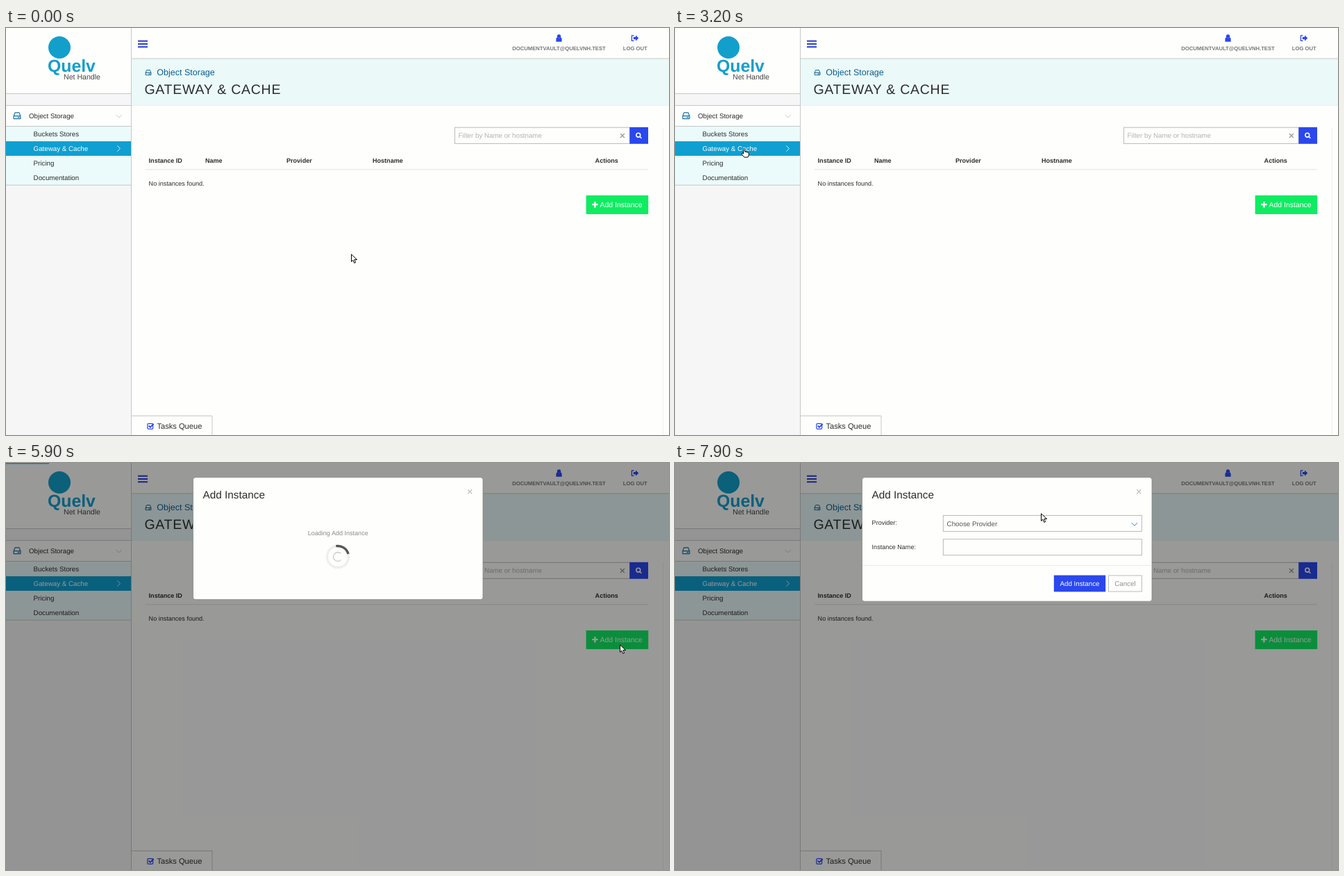
Recreate the animation shown at these times as an HTML page. Size 955 by 586 pixels, loop 8000 ms.

```html
<!DOCTYPE html>
<html lang="en">
<head>
<meta charset="utf-8">
<title>Gateway &amp; Cache</title>
<style>
  html, body { margin: 0; width: 100%; height: 100%; overflow: hidden; background: #fefefd; }
  svg { display: block; }
  text { font: 9.75px "Liberation Sans", Arial, sans-serif; fill: #2d2d2d; text-rendering: geometricPrecision; }
  .small text, text.small { font-size: 9.05px; }
  .head text { font-size: 9.05px; font-weight: bold; }
  .user text { font-size: 7.65px; font-weight: bold; fill: #777; }
  .line { fill: none; stroke: #c6c8c8; }
  .box rect { fill: #fefefd; stroke: #b9bbbb; }
  .blue { fill: #2a48ee; }
  .mid { text-anchor: middle; }
  text.white { fill: #fff; }
  .icon { fill: none; stroke-width: 1.2; stroke-linejoin: round; }
  .cursor { fill: #fff; stroke: #000; stroke-linejoin: round; }
</style>
</head>
<body>
<svg width="955" height="586">
  <defs>
    <g id="disk" class="icon">
      <path d="M.6 5.4 2.5.6H8.5L10.4 5.4V9.3H.6ZM.6 5.4H10.4M6.2 7.4H9"/>
    </g>
    <path id="chevron" d="M-4.1 -2.1 0 2.1 4.1 -2.1" fill="none"/>
    <path id="cross" d="M-3 -3 3 3M3 -3 -3 3" stroke-width="1.3"/>
  </defs>

  <!-- sidebar -->
  <rect width="180" height="586" fill="#f5f6f5"/>
  <rect width="180" height="94" fill="#fefefd"/>
  <rect y="112" width="180" height="30" fill="#fefefd"/>
  <rect y="142" width="180" height="84" fill="#ebfafa"/>
  <rect y="163.1" width="180" height="20.9" fill="#0f9fd0"/>
  <path class="line" d="M0 94.5H180M0 111.5H180M0 141.5H180M0 226.2H180M180.5 0V586"/>
  <circle cx="77" cy="28" r="16" fill="#139fcb"/>
  <text x="60" y="63" style="font-size:24.8px;font-weight:bold;fill:#139fcb">Quelv</text>
  <text x="83" y="73.6" style="font-size:10.6px;fill:#444">Net Handle</text>
  <use href="#disk" x="10.5" y="121.3" stroke="#14739f"/>
  <text x="33" y="130.4">Object Storage</text>
  <use href="#chevron" x="162.7" y="127" stroke="#c9cccc"/>
  <g id="menu"></g>
  <use href="#chevron" transform="translate(162.4 173.5) rotate(-90)" stroke="#d5f1fa"/>

  <!-- top bar -->
  <path d="M190 18.8H204M190 23H204M190 27.2H204" stroke="#2a3fcf" stroke-width="2"/>
  <g class="user mid">
    <text x="796.5" y="32">DOCUMENTVAULT@QUELVNH.TEST</text>
    <text x="906.2" y="32">LOG OUT</text>
  </g>
  <g class="blue">
    <circle cx="796.5" cy="12" r="2.7"/>
    <path d="M792.4 19.7V16Q792.4 13.6 794.3 13.6L796.5 15 798.7 13.6Q800.6 13.6 800.6 16V19.7Z"/>
    <path d="M903.8 13H907V10.5L911.3 14.6 907 18.7V16.2H903.8Z"/>
    <path d="M904.6 10.8H901.4V18.4H904.6" fill="none" stroke="#2a48ee" stroke-width="1.3" stroke-linejoin="round"/>
  </g>
  <rect x="181" y="44.5" width="774" height="67" fill="#ebf9f9"/>
  <path class="line" d="M181 44H955"/>
  <path d="M181 111.4H955" stroke="#e1eeee" stroke-width=".7"/>
  <use href="#disk" transform="translate(200.6 60.2) scale(.8)" stroke="#0b5f8f"/>
  <text x="217.3" y="67.6" style="font-size:12.53px;fill:#0b5f8f">Object Storage</text>
  <text x="199.4" y="95" style="font-size:19.5px;letter-spacing:.74px">GATEWAY &amp; CACHE</text>

  <!-- filter and table -->
  <g class="box"><rect x="646.5" y="143.2" width="252" height="23.2"/></g>
  <text x="651.6" y="158.4" style="fill:#b1b3b3">Filter by Name or hostname</text>
  <use href="#cross" x="887.9" y="155" stroke="#999"/>
  <rect class="blue" x="898.3" y="142.8" width="26.7" height="24"/>
  <g fill="none" stroke="#fff" stroke-width="1.6">
    <circle cx="910.8" cy="154.2" r="2.9"/>
    <path d="M912.9 156.3 915.4 158.8"/>
  </g>
  <g class="head">
    <text x="205.6" y="194">Instance ID</text>
    <text x="287" y="194">Name</text>
    <text x="404" y="194">Provider</text>
    <text x="528" y="194">Hostname</text>
    <text x="848.6" y="194">Actions</text>
  </g>
  <path d="M201 203.8H925" stroke="#dfe1e1"/>
  <path d="M946.3 143V586" stroke="#eceeee"/>
  <text class="small" x="205.6" y="227.4">No instances found.</text>
  <rect id="add" x="835.6" y="241" width="89.6" height="27"/>
  <path d="M844.2 254.2H852.6M848.4 250V258.4" stroke="#fff" stroke-width="2.3"/>
  <text class="white" x="855.6" y="258" style="font-size:10.44px">Add Instance</text>

  <!-- tasks tab -->
  <path class="line" d="M181 558.5H297V586"/>
  <g class="icon" stroke="#2a48ee">
    <rect x="203.8" y="569.6" width="7.8" height="7.8" rx="1.4"/>
    <path d="M205.6 572.6 207.9 574.9 212.7 570" stroke-width="1.8"/>
  </g>
  <text x="217.4" y="577" style="font-size:11.14px">Tasks Queue</text>

  <!-- dialog -->
  <g id="dialog">
    <rect width="955" height="586" fill="#000" fill-opacity=".4"/>
    <rect id="progress" height="1.4" fill="#0b78a8"/>
    <rect id="panel" x="269.5" y="20.8" width="417.5" rx="3.5" fill="#fefefd" stroke="#7f817d" stroke-width=".7"/>
    <text x="283.6" y="51" style="font-size:15.3px">Add Instance</text>
    <use href="#cross" x="668.2" y="41.2" stroke="#bfc1c1"/>
    <g id="loading" fill="none">
      <text class="small mid" x="478.2" y="104" style="fill:#8a8a8a">Loading Add Instance</text>
      <circle cx="478" cy="135" r="15.5" stroke="#eeefef" stroke-width="3.4"/>
      <g id="spin">
        <path d="M475.3 119.7A15.5 15.5 0 0 1 493 131" stroke="#555" stroke-width="3.4"/>
        <path d="M482.6 139.6A6.5 6.5 0 1 1 482.6 130.4" stroke="#c9cbcb" stroke-width="1.3"/>
      </g>
    </g>
    <g id="form">
      <g class="small">
        <text x="283.6" y="89.4">Provider:</text>
        <text x="283.6" y="123.6">Instance Name:</text>
      </g>
      <g class="box">
        <rect x="386.4" y="75.5" width="286" height="23"/>
        <rect x="386.4" y="109.7" width="286" height="23"/>
        <rect x="624.4" y="162" width="48" height="23"/>
      </g>
      <text x="391.6" y="90.6" style="fill:#555">Choose Provider</text>
      <use href="#chevron" x="661.9" y="88.2" stroke="#2b86bd"/>
      <path d="M270 147.5H686.7" stroke="#e8eaea"/>
      <rect class="blue" x="545.8" y="161.6" width="74.4" height="23.8"/>
      <text class="white mid" x="583" y="177.2">Add Instance</text>
      <text class="mid" x="648.4" y="177.2" style="fill:#909090">Cancel</text>
    </g>
  </g>

  <g id="pointer" class="cursor">
    <path id="arrow" d="M1.5.9V11.4L3.9 9.2 5.7 13.4 7.6 12.6 5.9 8.5H9.5Z"/>
    <path id="hand" d="M3.6 8V1.6Q4.6 -.4 5.6 1.6V5L9.5 5.9Q11.3 5.9 11.3 7.4V10L10 13.1H4.8L.9 8.6Q.6 7.2 2 7.4Z"/>
  </g>
</svg>

<script>
  const LOOP = 8000, TICK = 100;
  const OPEN = 5900, READY = 6100, BAR_END = 6300;

  const el = id => document.getElementById(id);
  const set = (id, name, value) => el(id).setAttribute(name, value);
  const show = (id, on) => set(id, "display", on ? "inline" : "none");
  const clamp = (v, lo, hi) => Math.min(hi, Math.max(lo, v));
  const ease = k => k * k * (3 - 2 * k);

  el("menu").innerHTML = ["Buckets Stores", "Gateway &amp; Cache", "Pricing", "Documentation"]
    .map((label, i) => `<text x="39.6" y="${156.4 + 20.9 * i}" class="${i === 1 ? "white" : ""}">${label}</text>`)
    .join("");

  // The pointer rests between moves; each move eases to its goal.
  const start = { x: 496, y: 325 };
  const moves = [
    { from: 400, to: 500, x: 496, y: 318 },
    { from: 900, to: 1400, x: 289, y: 219 },
    { from: 1700, to: 2300, x: 87, y: 175 },
    { from: 2300, to: 2500, x: 39, y: 178 },
    { from: 2500, to: 3200, x: 95, y: 173 },
    { from: 3500, to: 4000, x: 559, y: 309 },
    { from: 4200, to: 5300, x: 880, y: 260 },
    { from: 5800, to: 5900, x: 883, y: 261 },
    { from: 6600, to: 6700, x: 880, y: 267 },
    { from: 6700, to: 7200, x: 434, y: 234 },
    { from: 7300, to: 7700, x: 536, y: 61 },
    { from: 7700, to: 7900, x: 526, y: 72 }
  ];

  function pointerAt(t) {
    let { x, y } = start;
    for (const m of moves) {
      const k = ease(clamp((t - m.from) / (m.to - m.from), 0, 1));
      x += (m.x - x) * k;
      y += (m.y - y) * k;
    }
    return [x, y];
  }

  function draw(t) {
    const [x, y] = pointerAt(t);
    const open = t >= OPEN, ready = t >= READY;
    const onMenu = x < 176 && y > 140 && y < 226;
    const onAdd = !open && x > 832 && x < 921 && y > 240 && y < 267;
    const hand = onMenu || onAdd;

    set("pointer", "transform", `translate(${x} ${y})`);
    show("hand", hand);
    show("arrow", !hand);
    set("add", "fill", onAdd ? "#0cf724" : "#10ec62");

    show("dialog", open);
    show("loading", !ready);
    show("form", ready);
    show("progress", t < BAR_END);
    set("panel", "height", ready ? 178.4 : 175.8);
    set("progress", "width", clamp(62 + (t - OPEN) * 0.6, 0, 181));
    set("spin", "transform", `rotate(${(t - OPEN) * 0.36} 478 135)`);
  }

  function frame() {
    draw(Math.floor((performance.now() % LOOP) / TICK) * TICK);
    requestAnimationFrame(frame);
  }
  frame();
</script>
</body>
</html>
```
